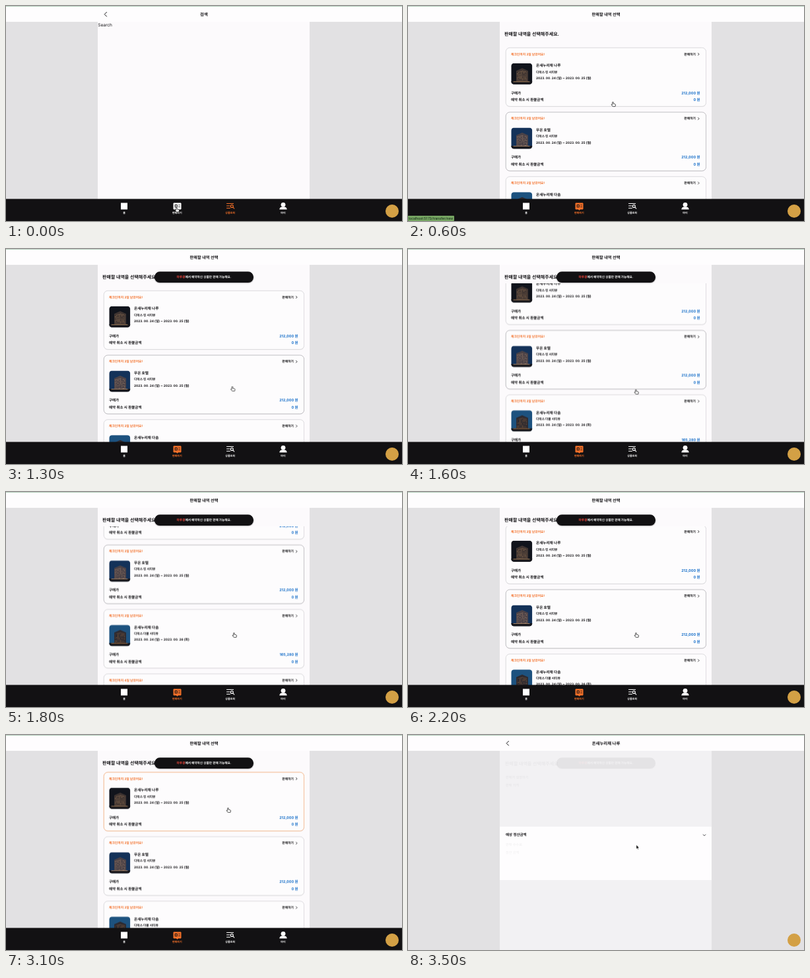
Write an HTML page that moves like this. It is 600 px wide and 326 px high and loops after 3.6 s.

```html
<!DOCTYPE html>
<html lang="ko">
<head>
<meta charset="utf-8">
<title>판매할 내역 선택</title>
<style>
  html, body { margin: 0; width: 100%; height: 100%; overflow: hidden; background: #e2e1e3; }
  svg { display: block; width: 600px; height: 326px; }
  text {
    font-family: Inter, "Noto Sans CJK KR", "Noto Sans CJK", sans-serif;
    font-weight: 700; fill: #151417; white-space: pre; text-rendering: geometricPrecision;
  }
  .line { fill: none; stroke-linecap: round; stroke-linejoin: round; }
</style>
</head>
<body>
<svg id="stage" viewBox="0 0 600 326"></svg>
<script>
const LOOP = 3600, TICK = 100, PITCH = 97.7;
const ORANGE = '#f37029', INK = '#151417', BAR = '#121113', PAPER = '#fcfafc', BLUE = '#176fc9';
const MID = 'text-anchor="middle"', END = 'text-anchor="end"';
const tint = c => `style="fill:${c}"`;

// Text placed by its vertical centre
const text = (x, y, size, str, attrs = '') =>
  `<text x="${x}" y="${y + size * .36}" font-size="${size}" ${attrs}>${str}</text>`;
const rect = (x, y, w, h, fill, attrs = '') =>
  `<rect x="${x}" y="${y}" width="${w}" height="${h}" fill="${fill}" ${attrs}/>`;
const line = (d, color = INK, width = .8) =>
  `<path class="line" d="${d}" stroke="${color}" stroke-width="${width}"/>`;

const header = (title, size, back) =>
  rect(0, 0, 600, 24, '#fefdfe') + text(300, 12.5, size, title, MID) +
  (back ? line('M152.5 9.3l-3.3 3.3l3.3 3.3', INK, 1) : '');

const icons = [
  () => rect(174, 298.5, 10, 10, '#fff'),
  c => `<path d="M254 299h11v9h-4l-1.500 1.500l-1.500-1.500h-4z" fill="${c}" stroke="${c}" stroke-linejoin="round"/>` +
    rect(256.2, 301.5, 3, 3.4, 'none', `stroke="${BAR}"`) + line('M261.5 301.8h2m-2 2.800h2', BAR),
  c => line('M334.5 299.5h10m-10 3.500h4.500m-4.500 3.500h5m4.400-1.300l1.900 2', c, 1.1) +
    `<circle cx="342.3" cy="303.6" r="2" fill="none" stroke="${c}" stroke-width="1.1"/>`,
  c => `<circle cx="420" cy="301.3" r="3.4" fill="${c}"/>` +
    `<path d="M414.3 308.6q.3-3.600 3.700-4.200h4q3.400.600 3.700 4.200z" fill="${c}"/>`
];
const nav = active => rect(0, 292.5, 600, 33.5, BAR) +
  ['홈', '판매하기', '상품조회', '마이'].map((label, i) => {
    const color = i === active ? ORANGE : '#fff';
    return icons[i](color) + text(179 + i * 80.3, 313.5, 4, label, `${MID} ${tint(color)}`);
  }).join('');

let seed = 7;
const random = () => (seed = seed * 16807 % 2147483647) / 2147483647;

// Night view of a tower with randomly lit windows
function photo(sky, wall, light) {
  let windows = '';
  for (let x = 165; x < 181; x += 2)
    for (let y = 35; y < 50; y += 2)
      windows += rect(x, y + Math.abs(x - 173) * .25, 1.2, 1, light, `opacity="${(random() * .8).toFixed(2)}"`);
  return `<g clip-path="url(#thumb)">${rect(156.3, 23.5, 32, 32, sky)}
    <path d="M164 52V35l9-4l9 4v17z" fill="${wall}"/>${windows}
    ${rect(156, 51, 33, 5, '#17171c')}${line('M160 51.500h24', light, .8)}</g>`;
}

const base = { days: 3, room: '디럭스 킹 시티뷰', out: '25 (월)', price: '212,000' };
const third = {
  ...base, name: '온새누리채 다솜', room: '디럭스 더블 시티뷰', out: '26 (화)',
  price: '165,280', pic: ['#1d527f', '#2d2a30', '#c08047']
};
const cards = [
  { ...base, name: '온새누리채 나루', pic: ['#11141c', '#3f3431', '#c99a6a'] },
  { ...base, name: '무온 호텔', pic: ['#143259', '#4b4247', '#c39a78'] },
  third,
  { ...third, days: 4 }
];
const card = (c, i) => `<g transform="translate(0 ${63.3 + i * PITCH})">
  ${rect(148.3, .8, 303.4, 89, '#00000010', 'rx="6"')}
  ${rect(148.2, 0, 303.4, 89, '#fdfcfd', `id="card${i}" rx="6" stroke="#d3d2d6" stroke-width=".8"`)}
  ${text(156, 9.7, 4.8, `체크인까지 ${c.days}일 남았어요!`, tint(ORANGE))}
  ${text(436, 9.7, 4.8, '판매하기', END)}
  ${line('M439.500 8.200l1.600 1.600l-1.600 1.600')}
  ${photo(...c.pic)}
  ${text(194, 27, 5.6, c.name)}
  ${text(194, 36.8, 4.7, c.room)}
  ${text(194, 46, 4.8, `2023. 00. 24 (일) ~ 2023. 00. ${c.out}`)}
  ${text(156, 68.5, 5.5, '구매가')}
  ${text(156, 79, 5.5, '예약 취소 시 환불금액')}
  ${text(442.6, 68.5, 5.5, c.price + ' 원', `${END} ${tint(BLUE)}`)}
  ${text(442.6, 79, 5.5, '0 원', `${END} ${tint(BLUE)}`)}
</g>`;

const searchPage = `<g id="search">
  ${rect(139, 24, 321, 269, PAPER)}${header('검색', 6.4, true)}
  ${text(139.3, 28.3, 6.5, 'Search', 'style="font-weight:400"')}${nav(2)}
</g>`;

const listPage = `<g id="list">
  ${rect(139, 24, 321, 269, PAPER)}
  <g clip-path="url(#view)"><g id="scroll">${cards.map(card).join('')}</g></g>
  ${header('판매할 내역 선택', 6.2)}
  ${text(146, 42.3, 7, '판매할 내역을 선택해주세요.')}${nav(1)}
</g>`;

const faint = ['판매가 설정하기', '판매 가격', '판매 수수료', '정산 금액'];
const detailPage = `<g id="detail">
  ${rect(139, 24, 321, 302, '#f2f1f3')}${rect(139, 139, 321, 81, '#fefdfe')}
  ${header(cards[0].name, 6.4, true)}
  ${text(148, 151.5, 5.5, '예상 정산금액')}
  ${line('M447.200 151l1.800 1.800l1.800-1.800')}
  <g opacity=".04">
    ${text(147, 43, 7, '판매할 내역을 선택해주세요')}
    ${faint.map((s, i) => text(148, 64 + (i % 2) * 12 + (i > 1) * 102, 5.2, s)).join('')}
  </g>
</g>`;

const overlays = `
  ${rect(0, 0, 600, 1, '#b4cfbd')}
  <g id="toast">
    ${rect(224.3, 35.5, 151.4, 17, '#00000026', 'rx="8.500"')}
    ${rect(225, 34.3, 150, 16.8, BAR, 'rx="8"')}
    ${text(300, 42.7, 4.65, `<tspan ${tint('#e8443a')}>마루콩</tspan>에서 예약하신 상품만 판매 가능해요.`, `${MID} ${tint('#fff')}`)}
  </g>
  <g id="status">
    ${rect(0, 318, 70, 8, '#76a562', 'rx="1"')}
    ${text(1, 322, 5.3, 'localhost:5173/transfer/new', 'style="font-family:Roboto,sans-serif;font-weight:400;fill:#142b18"')}
  </g>
  <circle cx="585" cy="311" r="10" fill="#d3a045"/>
  <g id="cursor">
    <path id="hand" d="M-1.300-3.200q.8-.8 1.500 0v2.300l2.500.600q.9.300.8 1.300l-.5 2.300h-3.800l-2-2.500q0-1 .9-.8l.600.500z" fill="#fff" stroke="#111" stroke-width=".7" stroke-linejoin="round"/>
    <path id="arrow" d="M-1-3.300v6l1.400-1.200l1 2.100l.9-.4l-.9-2.100h1.800z" fill="#111" stroke="#fff" stroke-width=".35"/>
  </g>`;

document.getElementById('stage').innerHTML = `
  <defs>
    <clipPath id="view">${rect(139, 52, 321, 241, '#000')}</clipPath>
    <clipPath id="thumb">${rect(156.3, 23.5, 32, 32, '#000', 'rx="4.500"')}</clipPath>
  </defs>
  ${rect(0, 0, 600, 326, '#e2e1e3')}` + searchPage + listPage + detailPage + overlays;

// Share of the way from a to b, 0 to 1
const part = (t, a, b) => Math.min(1, Math.max(0, (t - a) / (b - a)));
const easeOut = (p, power) => 1 - (1 - p) ** power;

// Samples a style rule once per tick and holds each value
function play(id, rule) {
  const frames = [];
  for (let t = 0; t <= LOOP; t += TICK)
    frames.push({ ...rule(t), offset: t / LOOP, easing: 'steps(1, end)' });
  document.getElementById(id).animate(frames, { duration: LOOP, iterations: Infinity, delay: -3 });
}
const show = (id, from, to) => play(id, t => ({ opacity: t >= from && t < to ? 1 : 0 }));

const OPEN = 300, HOVER = 2900, CLICK = 3300;
show('search', 0, OPEN);
show('list', OPEN, CLICK);
show('status', OPEN, 1000);
show('detail', CLICK, LOOP);
show('hand', 0, CLICK);
show('arrow', CLICK, LOOP);

play('toast', t => ({
  opacity: part(t, 900, 1000) * (1 - part(t, 3200, 3500)) ** 2 + .055 * part(t, 3400, 3500),
  transform: `translateY(${-8 * (1 - part(t, 1000, 1100))}px)`
}));

// A flick down, then a decaying return close to the top
const scrollY = t => t < 1900
  ? 86 * easeOut(part(t, 1500, 1900), 2)
  : 6.8 + 79.2 * Math.exp((1900 - t) / 118);
play('scroll', t => ({ transform: `translateY(${-scrollY(t)}px)` }));

play('card0', t => ({ stroke: t < HOVER ? '#d3d2d6' : '#f2a873' }));
play('card1', t => ({ stroke: t < HOVER ? '#b0afb4' : '#d3d2d6' }));

// Each glide: start, end, target x, target y
const glides = [[300, 600, 311, 149], [600, 1800, 346, 217], [2600, 3000, 337, 114], [3200, 3500, 347, 170]];
play('cursor', t => {
  let x = 259, y = 309;
  for (const [a, b, toX, toY] of glides) {
    const p = easeOut(part(t, a, b), 3);
    x += (toX - x) * p;
    y += (toY - y) * p;
  }
  return { transform: `translate(${x}px, ${y}px)` };
});
</script>
</body>
</html>
```
